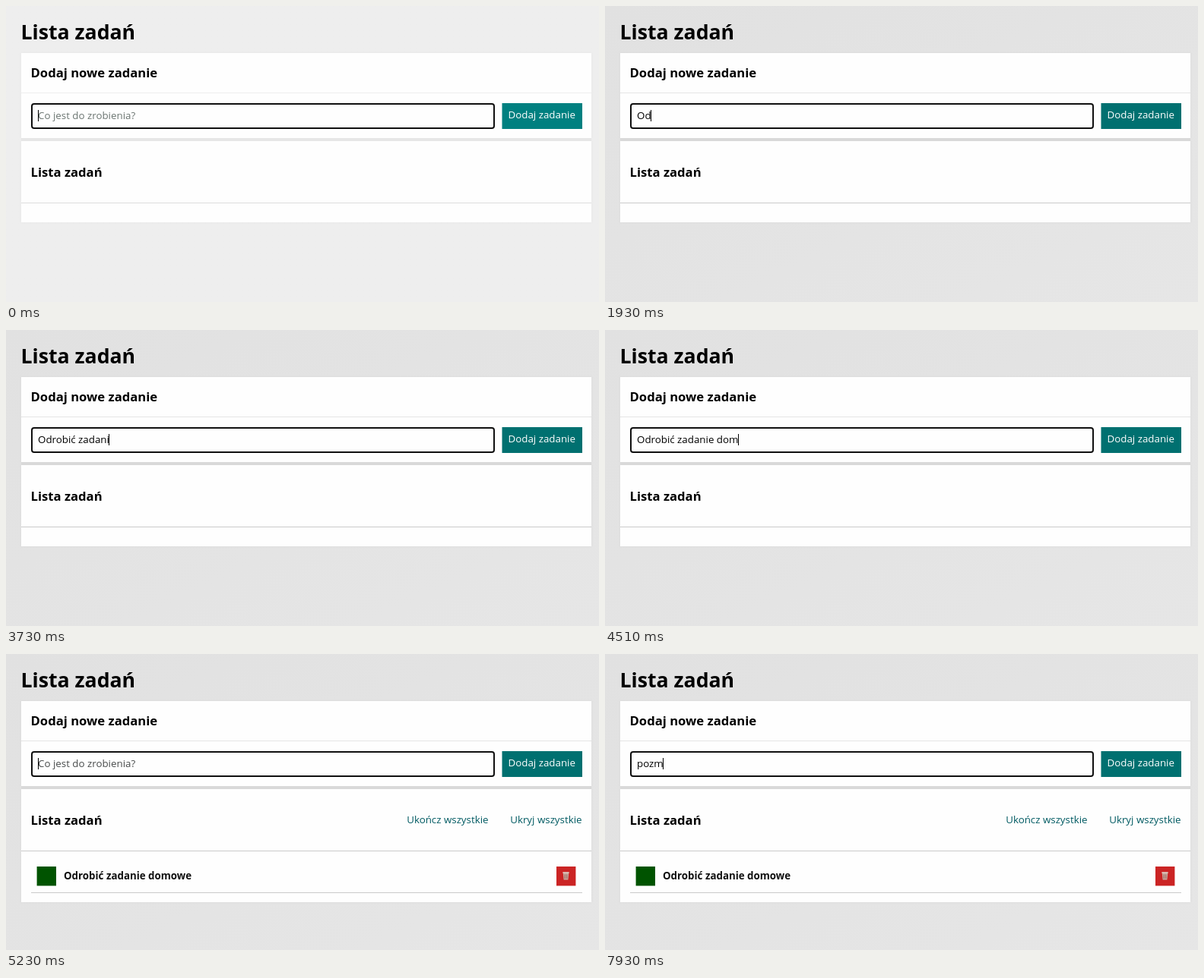
Recreate the animation shown at these times as an HTML page. Size 780 px wide and 390 px high, loop 7990 ms.

```html
<!DOCTYPE html>
<html lang="pl">
<head>
<meta charset="utf-8">
<title>Lista zadań</title>
<style>
  html, body { margin: 0; width: 100%; height: 100%; overflow: hidden; }
  svg {
    display: block; width: 780px; height: 390px;
    --page-a: color-mix(in srgb, #e1e1e1 var(--dim), #eee);
    --page-b: color-mix(in srgb, #e6e6e6 var(--dim), #eee);
    --edge: color-mix(in srgb, #d9d9d9 var(--dim), #e6e6e6);
    --rule: color-mix(in srgb, #cacaca var(--dim), #ddd);
    --soft-rule: color-mix(in srgb, #e4e4e4 var(--dim), #eee);
    --accent: color-mix(in srgb, #007070 var(--dim), teal);
    --hint: color-mix(in srgb, #484b4b var(--dim), #6b7571);
  }
  text { font: 13.333px "Open Sans", sans-serif; white-space: pre; }
  .title { font-size: 26.667px; font-weight: 700; }
  .heading { font-size: 16.667px; font-weight: 700; }
  .task { font-weight: 700; fill: #111; }
  .link { fill: #005a62; }
  .card { fill: #fefefe; filter: drop-shadow(0 0 1.5px var(--edge)); }
</style>
</head>
<body>
<svg viewBox="0 0 780 390">
  <defs>
    <linearGradient id="page" x2="1" y2="1">
      <stop style="stop-color: var(--page-a)"/>
      <stop offset="1" style="stop-color: var(--page-b)"/>
    </linearGradient>
  </defs>
  <rect width="780" height="390" fill="url(#page)"/>
  <text class="title" x="19.5" y="44">Lista zadań</text>

  <rect class="card" x="20" y="62" width="750" height="112"/>
  <rect class="card" id="list" x="20" y="178" width="750" height="107"/>
  <rect x="20" y="174" width="750" height="4" style="fill: var(--edge)"/>

  <text class="heading" x="32.5" y="94">Dodaj nowe zadanie</text>
  <rect x="20" y="114" width="750" height="1" style="fill: var(--soft-rule)"/>
  <rect x="34" y="129" width="608" height="32" rx="3" fill="#fefefe" stroke="#101010" stroke-width="2"/>
  <text id="hint" x="42" y="149" style="fill: var(--hint)">Co jest do zrobienia?</text>
  <text id="typed" x="42" y="149"></text>
  <rect id="caret" y="137" width="1" height="15"/>
  <rect x="652.5" y="128" width="105.5" height="34" style="fill: var(--accent)"/>
  <text x="660.5" y="148" fill="#fff">Dodaj zadanie</text>

  <text class="heading" x="32.5" y="225">Lista zadań</text>
  <rect x="20" y="259" width="750" height="1" style="fill: var(--rule)"/>

  <g id="added">
    <text class="link" x="634.5" y="223" text-anchor="end">Ukończ wszystkie</text>
    <text class="link" x="757.5" y="223" text-anchor="end">Ukryj wszystkie</text>
    <rect x="40.6" y="280" width="25.4" height="25.4" fill="#005300"/>
    <text class="task" x="76" y="297">Odrobić zadanie domowe</text>
    <rect x="724" y="280" width="25.4" height="25.4" fill="#cb2424"/>
    <path d="M732.8 289h7.4l-.8 8.6h-5.8z" fill="#c9a69b"/>
    <path d="M732.4 287.2h8.2v1.8h-8.2z" fill="#dccabf"/>
    <path d="M735.2 290.5v5.5M737.8 290.5v5.5" stroke="#8f5048" stroke-width=".8"/>
    <rect x="33" y="314" width="725" height="1" fill="#cacaca"/>
  </g>
</svg>
<script>
  const LOOP = 7990, KEY = 150, BLINK = 500, SUBMIT = 5110;
  const entries = [
    { text: "Odrobić zadanie domowe", start: 1730, end: SUBMIT },
    { text: "pozm", start: 7430, end: LOOP },
  ];
  const $ = id => document.getElementById(id);
  const show = (el, on) => el.setAttribute("visibility", on ? "visible" : "hidden");
  const svg = document.querySelector("svg");

  function inputAt(t) {
    let text = "", lastKey = -250;
    for (const e of entries) {
      if (t < e.start) break;
      const count = Math.min(e.text.length, Math.floor((t - e.start) / KEY) + 1);
      lastKey = e.start + (count - 1) * KEY;
      text = t < e.end ? e.text.slice(0, count) : "";
    }
    return { text, lastKey };
  }

  function draw(t) {
    const dim = Math.max(0, Math.min(1, Math.floor(t / 60) / 10));
    svg.style.setProperty("--dim", dim * 100 + "%");

    const { text, lastKey } = inputAt(t);
    const typed = $("typed");
    if (typed.textContent !== text) typed.textContent = text;
    show($("hint"), !text);
    const width = text ? typed.getComputedTextLength() : 0;
    $("caret").setAttribute("x", Math.floor(42 + width));
    show($("caret"), Math.floor((t - lastKey) / BLINK) % 2 === 0);

    const added = t >= SUBMIT;
    show($("added"), added);
    $("list").setAttribute("height", added ? 149 : 107);
  }

  const origin = performance.now();
  function tick() {
    draw((performance.now() - origin) % LOOP);
    requestAnimationFrame(tick);
  }
  tick();
</script>
</body>
</html>
```
